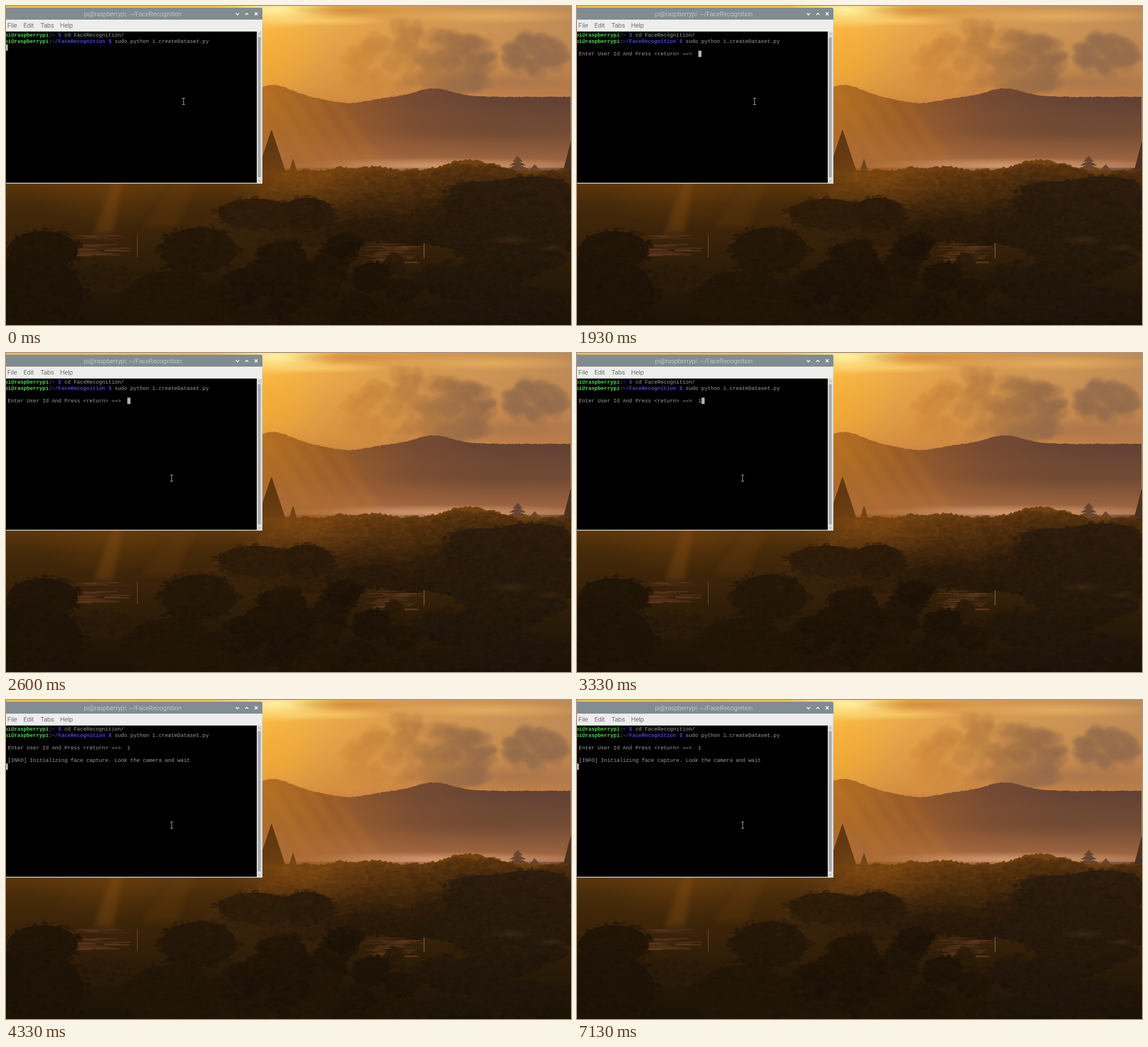
Recreate the animation shown at these times as an HTML page with a canvas. Size 996x562 px, loop 8000 ms.

```html
<!DOCTYPE html>
<html lang="en">
<head>
<meta charset="utf-8">
<title>Terminal on a sunset desktop</title>
<style>
html, body { margin: 0; width: 100%; height: 100%; overflow: hidden; background: #2a1906; }
canvas, svg { position: absolute; left: 0; top: 0; width: 996px; height: 562px; display: block; }
text { white-space: pre; }
.ui { font: 300 11.15px Roboto, "Open Sans", sans-serif; }
.term { font: 9.23px "Liberation Mono", "DejaVu Sans Mono", monospace; fill: #a0a0a0; }
.user { font-weight: bold; fill: #4be04b; }
.dir { font-weight: bold; fill: #4845dc; }
</style>
</head>
<body>
<canvas id="scene" width="996" height="562"></canvas>
<svg viewBox="0 0 996 562">
  <defs><clipPath id="screen"><rect y="45" width="442" height="266.5"/></clipPath></defs>
  <path d="M0 3H449Q452 3 452 6V313H0Z" fill="#dcdcda"/>
  <path d="M0 3H449Q452 3 452 6V24H0Z" fill="#818c91"/>
  <rect y="24" width="451" height="21" fill="#ededec"/>
  <rect y="45" width="442" height="266.5"/>
  <rect x="444" y="55" width="5" height="247" rx="1" fill="#aaacab"/>
  <path d="M444.5 50.5l2 -2.500l2 2.500M444.500 307l2 2.500l2 -2.500" fill="none" stroke="#9b9b9b"/>
  <path d="M405.300 12.800l2.700 2.700l2.700 -2.700M421.800 15.500l2.700 -2.700l2.700 2.700M438.500 11.300l5 5m0 -5l-5 5" fill="none" stroke="#fff" stroke-width="1.6"/>
  <text class="ui" x="137.500" y="18" fill="#dce0e1">pi@raspberrypi: ~/FaceRecognition</text>
  <g class="ui" fill="#303030">
    <text x="2.500" y="38">File</text>
    <text x="30.700" y="38">Edit</text>
    <text x="60.800" y="38">Tabs</text>
    <text x="95.500" y="38">Help</text>
  </g>
  <g class="term" clip-path="url(#screen)">
    <text x="-2.200" y="54"><tspan class="user">pi@raspberrypi</tspan>:<tspan class="dir">~ $</tspan> cd FaceRecognition/</text>
    <text x="-2.200" y="65.100"><tspan class="user">pi@raspberrypi</tspan>:<tspan class="dir">~/FaceRecognition $</tspan> sudo python 1.createDataset.py</text>
    <text id="ask" x="-2.200" y="87.200"></text>
    <text id="info" x="-2.200" y="109.400"></text>
    <rect id="caret" width="5.540" height="11.070" fill="#b4b4b4"/>
  </g>
  <path id="mouse" d="M-2.500 -5.500H2.500M0 -5.500V5.500M-2.500 5.500H2.500" fill="none" stroke="#b9b9b9"/>
</svg>
<script>
const $ = id => document.getElementById(id);
const c = $('scene').getContext('2d');
const W = 996, H = 562;
let seed = 7;
const rnd = () => (seed = (seed * 16807) % 2147483647) / 2147483647;
const jit = n => (rnd() - 0.5) * 2 * n;
const bump = (x, mid, width) => Math.exp(-(((x - mid) / width) ** 2));
const mix = (a, b, k) => a.map((v, i) => v + (b[i] - v) * k);
const rgba = (rgb, a = 1) => `rgba(${rgb},${a})`;

function grad(x0, y0, x1, y1, ...stops) {
  const g = c.createLinearGradient(x0, y0, x1, y1);
  stops.forEach((s, i) => g.addColorStop(i / (stops.length - 1), s));
  return g;
}

function oval(x, y, rx, ry, fill) {
  c.fillStyle = fill;
  c.beginPath();
  c.ellipse(x, y, rx, ry, 0, 0, 7);
  c.fill();
}

function glow(x, y, rx, ry, rgb, a) {
  c.save();
  c.translate(x, y);
  c.scale(rx, ry);
  const g = c.createRadialGradient(0, 0, 0, 0, 0, 1);
  g.addColorStop(0, rgba(rgb, a));
  g.addColorStop(1, rgba(rgb, 0));
  oval(0, 0, 1, 1, g);
  c.restore();
}

// Fills everything below the height given by top(x).
function land(from, top, fill, rough) {
  c.fillStyle = fill;
  c.beginPath();
  c.moveTo(from, H);
  for (let x = from; x <= W; x += 3) c.lineTo(x, top(x) + jit(rough));
  c.lineTo(W, H);
  c.fill();
}

function beam(x, y, dx, dy, w, color) {
  c.filter = 'blur(5px)';
  c.fillStyle = color;
  c.beginPath();
  c.moveTo(x, y);
  c.lineTo(x + w / 2, y);
  c.lineTo(x + dx + w, y + dy);
  c.lineTo(x + dx, y + dy);
  c.fill();
  c.filter = 'none';
}

// A heap of small tufts, lit from above, thinning out at the rim.
function tree(x, y, rx, ry, rgb) {
  oval(x, y, rx * 0.88, ry * 0.88, rgba(rgb));
  const n = 40 + rx * ry / 25;
  for (let i = 0; i < n; i++) {
    const a = rnd() * 6.283, d = Math.sqrt(rnd());
    const k = 1 + jit(0.16) - Math.sin(a) * d * 0.1;
    oval(x + Math.cos(a) * rx * d, y + Math.sin(a) * ry * d, 2 + rnd() * 5, 1.5 + rnd() * 3, rgba(rgb.map(v => v * k), 0.6));
  }
}

function sky() {
  c.fillStyle = grad(452, 0, W, 0, '#f9be48', '#e8a64b', '#d6994f', '#cb9354', '#bf8a56');
  c.fillRect(0, 0, W, 300);
  c.fillStyle = grad(0, 40, 0, 170, 'rgba(190,115,55,0)', 'rgba(182,108,55,.5)');
  c.fillRect(0, 0, W, 300);
  glow(455, 95, 110, 90, [250, 168, 45], 0.6);
  glow(475, 6, 110, 34, [255, 243, 165], 0.95);
  glow(560, 26, 120, 10, [255, 222, 120], 0.6);
  glow(610, 8, 110, 10, [196, 130, 58], 0.6);
  glow(850, 18, 190, 14, [235, 182, 100], 0.7);
  c.filter = 'blur(2px)';
  for (let i = 0; i < 150; i++) {
    const x = 600 + rnd() * 250;
    const top = 92 - 66 * bump(x, 695, 62) - 40 * bump(x, 805, 55);
    const y = top + rnd() * (150 - top);
    oval(x, y, 9 + rnd() * 13, 7 + rnd() * 8, rgba(mix([214, 140, 60], [150, 108, 74], (x - 590) / 230), 0.35));
  }
  for (let i = 0; i < 90; i++) {
    const a = rnd() * 6.283, d = Math.sqrt(rnd());
    oval(935 + Math.cos(a) * d * 52, 84 + Math.sin(a) * d * 34, 8 + rnd() * 8, 6 + rnd() * 6, rgba([150, 109, 77], 0.4));
  }
  c.filter = 'none';
  glow(900, 135, 170, 24, [160, 112, 76], 0.7);
  for (let i = 0; i < 6; i++) beam(610 + i * 26, 45, -100, 120, 28, 'rgba(240,168,75,.13)');
}

function hills() {
  const ridge = x => 160 - 21 * bump(x, 470, 45) + 11 * bump(x, 605, 50) - 15 * bump(x, 755, 45);
  land(452, ridge, grad(452, 0, W, 0, '#b57022', '#93592a', '#754a33', '#654434', '#604135'), 0.7);
  c.fillStyle = grad(0, 165, 0, 280, 'rgba(165,102,55,0)', 'rgba(165,102,55,.3)', 'rgba(180,116,72,.8)');
  c.fillRect(452, 165, 544, 120);
  glow(830, 215, 210, 28, [104, 68, 46], 0.4);
  for (let i = 0; i < 4; i++) beam(450 + i * 36, 152, 75, 125, 34, 'rgba(215,135,40,.13)');
  glow(780, 281, 290, 14, [214, 156, 112], 0.95);
}

function spire(x, top, base, w, color) {
  for (let y = top; y < base; y += 2) {
    const k = (y - top) / (base - top);
    c.fillStyle = color;
    c.fillRect(x - w * k - 1, y, 2 * w * k + 2, 2);
  }
}

function temples() {
  spire(468, 219, 300, 27, '#613811');
  spire(506, 270, 300, 9, '#68401a');
  spire(W, 240, 305, 17, '#4b3020');
  for (let i = 0; i < 4; i++) spire(902, 264 + i * 7, 273 + i * 7, 8 + i * 6, '#674530');
  spire(932, 279, 297, 17, '#674530');
}

function forest() {
  const tops = x => 290 - 19 * bump(x, 815, 55) - 8 * bump(x, 650, 35) - 6 * bump(x, 590, 18);
  land(0, tops, grad(0, 280, 0, H, '#70420f', '#452909', '#372109', '#251907', '#1b1206'), 2);
  glow(190, 315, 150, 75, [112, 65, 14], 0.5);
  beam(190, 300, -35, 100, 34, 'rgba(150,88,20,.3)');
  beam(310, 300, -70, 90, 60, 'rgba(110,64,16,.25)');

  // Rows of crowns, darker towards the viewer and to the right.
  for (let row = 0; row < 6; row++)
    for (let x = 490 - row * 22; x < 1000; x += 36 + row * 4) {
      const tone = mix([104, 60, 17], [40, 25, 9], Math.min(1, row / 6 + (x - 500) / 1100));
      tree(x + jit(12), tops(x) + 15 + row * 20 + jit(4), 32 + row * 5, 13 + row * 2, tone);
    }
  glow(520, 305, 130, 60, [150, 86, 18], 0.4);

  for (const [x, y, w] of [[115, 403, 117], [630, 418, 120]])
    for (let i = 0; i < 45; i++) {
      c.fillStyle = rgba(mix([66, 40, 18], [108, 65, 36], rnd()), 0.6);
      c.fillRect(x + rnd() * w * 0.6, y + rnd() * 36, w * (0.15 + rnd() * 0.25), 2);
    }
  c.fillStyle = '#6e482b';
  c.fillRect(231, 403, 1, 40);
  c.fillRect(736, 413, 2, 31);
}

function foreground() {
  const dark = [28, 18, 7], brown = [45, 28, 9];
  for (const [x, y, rx, ry, k] of [
    [440, 366, 75, 30, 1], [530, 366, 55, 32, 0.9], [175, 480, 60, 30, 0.8],
    [340, 430, 75, 45, 0.5], [684, 465, 24, 32, 0.9], [765, 500, 60, 55, 0.6],
    [65, 430, 70, 38, 0.3], [40, 510, 110, 80, 0.1], [290, 520, 95, 60, 0.3]])
    tree(x, y, rx, ry, mix(dark, brown, k));

  // The round central tree, built as a dome of smaller crowns.
  for (let i = 0; i < 40; i++) {
    const x = 385 + rnd() * 320;
    const top = 565 - 172 * Math.sqrt(Math.max(0, 1 - ((x - 552) / 180) ** 2));
    tree(x, top + 22 + rnd() * (H - top), 34, 23, mix(dark, brown, 0.1 + rnd() * 0.25));
  }
  // The right-hand tree: flat layers that spread out downwards.
  for (let i = 0; i < 30; i++) {
    const y = 318 + i * 8;
    tree(925 - Math.min(60, i * 5) + jit(90), y, 75, 20, mix([43, 28, 13], [30, 20, 9], i / 30));
  }
  glow(893, 412, 40, 10, [84, 52, 22], 0.4);
  glow(960, 426, 32, 8, [84, 52, 22], 0.4);
}

[sky, hills, temples, forest, foreground].forEach(f => f());

const LOOP = 8000, TICK = 400 / 6;
const prompt = ' Enter User Id And Press <return> ==>  ';
// time, prompt line, info line, caret column, caret row
const steps = [
  [0, '', '', 0, 2],
  [1730, prompt, '', 39, 3],
  [3330, prompt + '1', '', 40, 3],
  [4330, prompt + '1', ' [INFO] Initializing face capture. Look the camera and wait', 0, 6]
];
let start, shown;

function draw(now) {
  start ??= now;
  const t = (now - start) % LOOP;
  const step = steps.findLast(s => t >= s[0]);
  if (step !== shown) {
    const [, ask, info, col, row] = shown = step;
    $('ask').textContent = ask;
    $('info').textContent = info;
    $('caret').setAttribute('x', -2.2 + col * 5.54);
    $('caret').setAttribute('y', 45.5 + row * 11.07);
  }
  const k = Math.min(1, Math.max(0, Math.floor((t - 2200) / TICK + 1.01) / 7));
  const p = k * k * (3 - 2 * k);
  $('mouse').setAttribute('transform', `translate(${313 - 21 * p} ${168 + 52.5 * p})`);
  requestAnimationFrame(draw);
}
requestAnimationFrame(draw);
</script>
</body>
</html>
```
